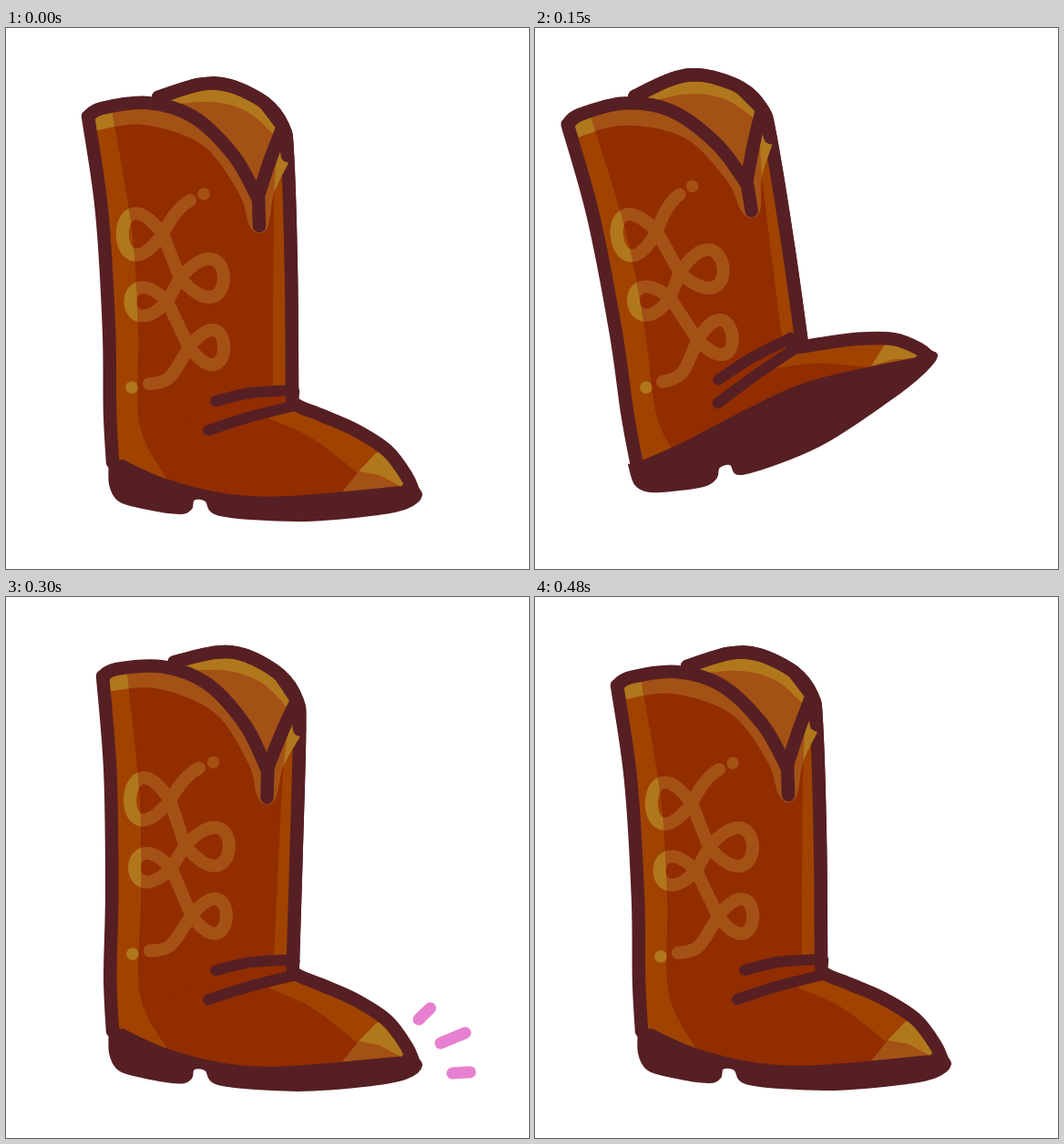
Write an HTML page with a canvas that moves like this. It is 574 px wide and 593 px high and loops after 0.51 s.

```html
<!DOCTYPE html>
<html lang="en">
<head>
<meta charset="utf-8">
<title>Tapping boot</title>
<style>
html, body { margin: 0; width: 100%; height: 100%; overflow: hidden; background: #fff; }
canvas { display: block; }
</style>
</head>
<body>
<canvas id="stage" width="574" height="593"></canvas>
<script>
const ctx = document.getElementById('stage').getContext('2d');
const DARK = '#561f24', MAIN = '#922d00', EDGE = '#a04300', TRIM = '#a45115', GOLD = '#b1771c', PINK = '#e780d0';
const LOOP = 510, STEP = 30, INK = 14.5;

// Key points of the boot at rest; the pose bends them.
const shaft = {
  left: '90,97 105,200 113,330 114,420 117,476',
  rim: '90,97 105,88 155,82 205,97 250,140 277,188',
  slit: '277,184 278,217',
  flap: '277,184 289,147 303,110',
  back: '167,76 212,62 245,63 284,82 304,108',
  side: '304,108 309,140 313,270 314,406',
  lining: '176,85 225,81 265,92 299,122',
  base: '125,476 190,488 313,420',
  leftEdge: '116,90 138,220 145,330 147,435 178,497',
  rightEdge: '298,130 294,200 293,414',
  trim: '92,114 150,106 215,128 255,180 267,216 278,225 288,216 294,182 310,148',
  dots: '217,182 138,394'
};
const foot = {
  crease: '230,409 268,400 315,397',
  fold: '222,441 265,427 316,414',
  top: '315,398 317,412 345,424 382,440 418,463 440,492 448,511',
  shine: '288,428 335,449 385,487',
  cap: '406,466 387,486 366,512',
  glint: '410,490'
};
const seam = '434,503 310,514 240,511 175,495 128,474';
const under = '114,470 114,500 124,518 150,526 190,532 203,527 206,517 219,518 235,534 320,540 400,534 440,526 456,512 446,498';

// Embroidered loops: crossing point, sideways reach, height.
const loops = [[172, 226, -59, 79], [191, 274, 64, 73], [177, 300, -54, 54], [201, 350, 51, 66]];
const rays = [[453, 463, 491, 426], [477, 489, 558, 455], [490, 522, 548, 518]];

const clamp = x => Math.min(1, Math.max(0, x));
const ease = x => x * x * (3 - 2 * x);
const flip = pts => [...pts].reverse();
const place = (text, warp) => text.split(' ').map(p => warp(p.split(',').map(Number)));
const placeAll = (set, warp) => Object.fromEntries(Object.entries(set).map(([k, v]) => [k, place(v, warp)]));

function poseAt(time) {
  const step = Math.floor(time / STEP);
  const rise = clamp((step - 1) / 3) ** 1.35, fall = ease(clamp((8 - step) / 4)) ** 1.5;
  const lean = .168 * rise * fall;
  const bend = Math.sin(Math.PI * clamp((step - 8) / 8));
  return {
    lean, bend,
    tilt: lean * (1.85 + .3 * step) - .006 * bend,
    ray: [clamp((step - 12) / 3), clamp((step - 9) / 3)]
  };
}

// Bends the shaft above the ankle and turns it about the heel.
const shaftWarp = ({ lean, bend }) => ([x, y]) => {
  const h = Math.max(0, 430 - y), c = Math.cos(lean), s = Math.sin(lean);
  const u = x - 130 + bend * h * (.035 + .0001 * h);
  const v = y - 518 + (h && bend * (x - 230) * (.035 + .0002 * h));
  return [130 + u * c + v * s, 518 - u * s + v * c];
};

// Raises the toe; swell curves the middle of the sole.
const footWarp = ({ tilt }, swell = 0) => ([x, y]) => {
  const u = x - 100, h = Math.max(0, 518 - y);
  return [
    x - .5 * tilt * h - .2 * tilt * tilt * u,
    y - tilt * u + .7 * tilt * h + swell * Math.sin(Math.PI * clamp((x - 131) / 302))
  ];
};

// Appends a smooth curve through the points.
function curve(path, pts) {
  path.lineTo(...pts[0]);
  for (let i = 0; i < pts.length - 1; i++) {
    const b = pts[i], c = pts[i + 1], a = pts[i - 1] || b, d = pts[i + 2] || c;
    path.bezierCurveTo(
      b[0] + (c[0] - a[0]) / 6, b[1] + (c[1] - a[1]) / 6,
      c[0] - (d[0] - b[0]) / 6, c[1] - (d[1] - b[1]) / 6, ...c);
  }
}

function shape(...parts) {
  const path = new Path2D();
  parts.forEach(p => curve(path, p));
  return path;
}

function polygon(pts) {
  const path = new Path2D();
  pts.forEach(p => path.lineTo(...p));
  return path;
}

function scrollPath(warp) {
  const path = new Path2D(), at = (x, y) => warp([x, y]);
  path.moveTo(...at(202, 189));
  path.quadraticCurveTo(...at(186, 198), ...at(172, 226));
  for (const [x, y, reach, rise] of loops) {
    path.lineTo(...at(x, y));
    path.bezierCurveTo(...at(x + reach, y + rise), ...at(x + reach, y - rise), ...at(x, y));
  }
  path.bezierCurveTo(...at(183, 378), ...at(184, 389), ...at(157, 390));
  return path;
}

function fill(path, color) {
  ctx.fillStyle = color;
  ctx.fill(path);
}

function stroke(path, color, width) {
  ctx.strokeStyle = color;
  ctx.lineWidth = width;
  ctx.stroke(path);
}

function clipped(paths, paint) {
  ctx.save();
  paths.forEach(p => ctx.clip(p));
  paint();
  ctx.restore();
}

function draw(pose) {
  const warp = shaftWarp(pose), { tilt } = pose;
  const s = placeAll(shaft, warp), f = placeAll(foot, footWarp(pose));
  const seamLine = place(seam, footWarp(pose, -85 * tilt));
  const sole = shape(place(under, footWarp(pose, 80 * tilt * tilt)), seamLine);

  ctx.fillStyle = '#fff';
  ctx.fillRect(0, 0, 574, 593);
  ctx.lineCap = ctx.lineJoin = 'round';

  const opening = [flip(s.flap), flip(s.rim).slice(0, 4)];
  const outside = shape([...s.back, ...s.side.slice(1)]);
  fill(shape(s.back, ...opening), GOLD);
  fill(shape(s.lining, ...opening), TRIM);
  stroke(outside, DARK, INK);

  const body = shape(s.left);
  s.base.forEach(p => body.lineTo(...p));
  [s.side, s.flap, s.rim].forEach(p => curve(body, flip(p)));
  const leftStrip = shape(s.leftEdge, flip(s.left));
  const rightStrip = shape(s.rightEdge, flip(s.side));
  const trim = shape(s.trim, flip(s.flap), flip(s.rim));
  const scroll = scrollPath(warp);

  const decorate = color => {
    fill(trim, color);
    stroke(scroll, color, 14);
    s.dots.forEach(p => stroke(polygon([p, p]), color, 13.5));
  };

  fill(body, MAIN);
  clipped([body], () => fill(rightStrip, EDGE));
  stroke(outside, DARK, INK);

  const toe = [seamLine[0], ...flip(f.top).slice(1, 3)];
  fill(shape(f.crease, f.top, seamLine), MAIN);
  fill(shape(f.shine, flip(f.top).slice(2, 6)), EDGE);
  fill(polygon([...f.cap, ...toe]), TRIM);
  fill(polygon([...f.cap.slice(0, 2), ...f.glint, ...toe]), GOLD);

  fill(leftStrip, EDGE);
  decorate(TRIM);
  [leftStrip, rightStrip].forEach(strip => clipped([body, strip], () => decorate(GOLD)));

  fill(sole, DARK);
  stroke(sole, DARK, 2);
  [shape(flip(s.left), s.rim), shape(s.back.slice(3), s.side.slice(0, 2)), shape(s.flap), shape(s.slit), shape(f.top)]
    .forEach(path => stroke(path, DARK, INK));
  [f.crease, f.fold].forEach(p => stroke(shape(p), DARK, 12));

  const [from, to] = pose.ray;
  if (from < to) rays.forEach(([x, y, x2, y2]) => {
    const at = k => [x + (x2 - x) * k, y + (y2 - y) * k];
    stroke(polygon([at(from), at(to)]), PINK, 13);
  });
}

const start = performance.now();
function frame(now) {
  draw(poseAt(Math.max(0, now - start) % LOOP));
  requestAnimationFrame(frame);
}
frame(start);
</script>
</body>
</html>
```
